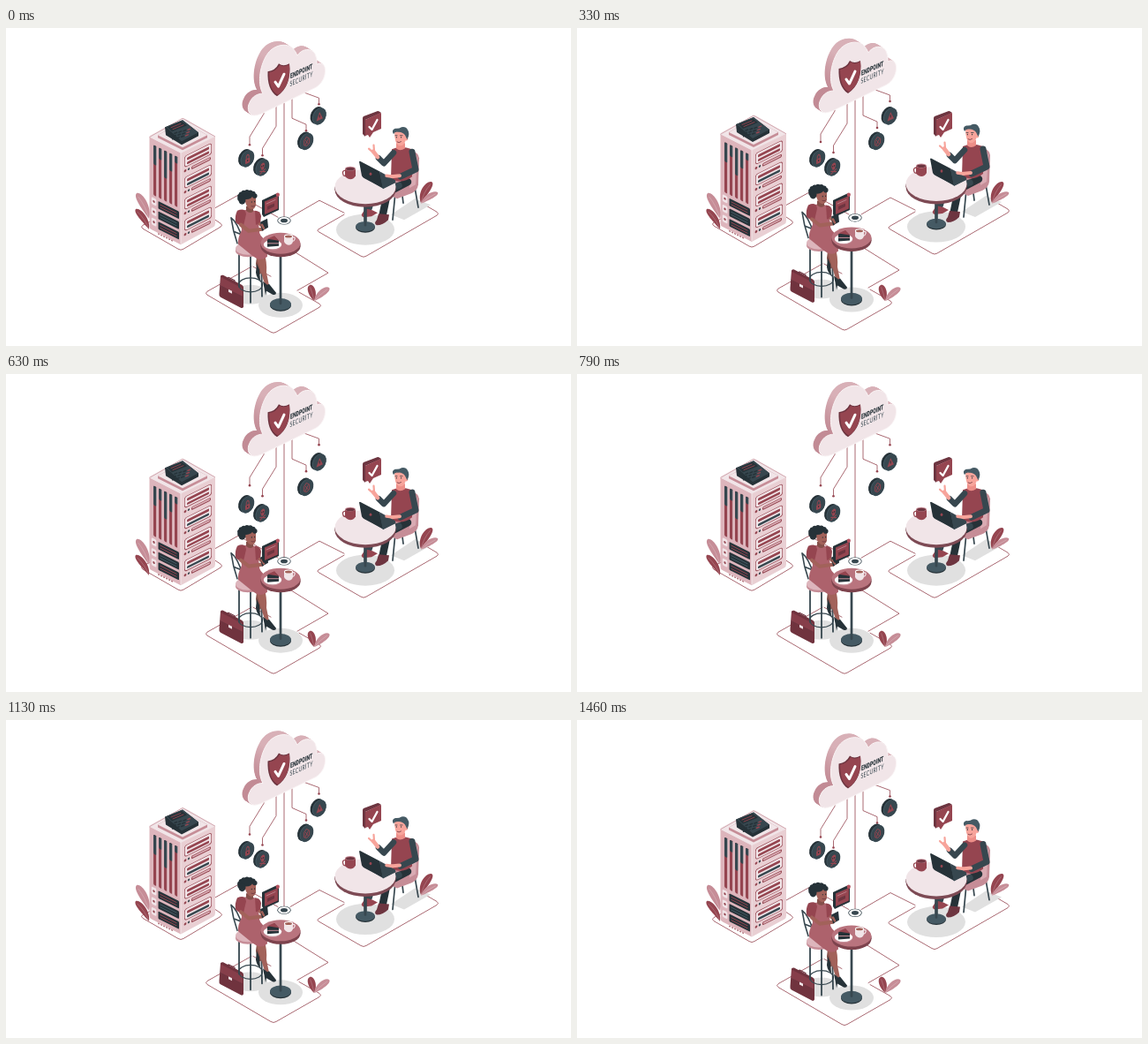
An HTML page with a canvas for the animation above (1.5 s loop, 640 by 360 pixels).

```html
<!DOCTYPE html>
<html lang="en">
<head>
<meta charset="utf-8">
<title>Endpoint security</title>
<style>
html, body { margin: 0; width: 100%; height: 100%; overflow: hidden; background: #fff; }
canvas { display: block; }
</style>
</head>
<body>
<canvas id="stage" width="640" height="360"></canvas>
<script>
const ctx = document.getElementById('stage').getContext('2d');
const LOOP = 1500, LEAD = 1000 / 24, RISE = 7.2, REST = 0.6;
const C = {
  wine: '#954550', deep: '#6d3540', rose: '#c68d97', blush: '#ddb5bc',
  pale: '#f1e5e8', dark: '#37474f', ink: '#263238', skin: '#f7a49b',
  brown: '#a2625a', umber: '#85504a', shade: '#e0e0e0', hair: '#455a64', dress: '#ad626c'
};
ctx.lineJoin = ctx.lineCap = 'round';

function fill(d, color) {
  ctx.fillStyle = color;
  ctx.fill(new Path2D(d));
}
function line(d, color, width = 0.8) {
  ctx.strokeStyle = color;
  ctx.lineWidth = width;
  ctx.stroke(new Path2D(d));
}
function oval(x, y, rx, ry, color, tilt = 0) {
  ctx.beginPath();
  ctx.ellipse(x, y, rx, ry, tilt, 0, Math.PI * 2);
  ctx.fillStyle = color;
  ctx.fill();
}
function rect(x, y, w, h, color, r = 0) {
  ctx.beginPath();
  ctx.roundRect(x, y, w, h, r);
  ctx.fillStyle = color;
  ctx.fill();
}
// Draws in a local space: moved to x, y, then scaled and sheared.
function within(x, y, draw, sx = 1, shear = 0) {
  ctx.save();
  ctx.transform(sx, shear, 0, 1, x, y);
  draw();
  ctx.restore();
}
// A round-tipped leaf from its stem x, y to its tip; bend curves it sideways.
function leaf(x, y, tx, ty, width, color, bend = 0) {
  const dx = tx - x, dy = ty - y, len = Math.hypot(dx, dy);
  const at = (t, k) => `${x + dx * t - dy / len * k} ${y + dy * t + dx / len * k}`;
  fill(`M${x} ${y}C${at(0.35, bend + width)} ${at(1, width)} ${tx} ${ty}` +
    `C${at(0.95, -width)} ${at(0.35, bend - width)} ${x} ${y}Z`, color);
  line(`M${x} ${y}Q${at(0.45, bend * 0.7)} ${at(0.85, 0)}`, 'rgba(255,255,255,.4)', 0.5);
}
function tableTop(x, y, rx, ry, thick, top, edge) {
  oval(x, y + thick, rx, ry, edge);
  rect(x - rx, y, rx * 2, thick, edge);
  oval(x, y, rx, ry, top);
}

function ground() {
  line('M163 219L155 223Q152 225 155 227L195 250Q198 252 201 250L243 225Q246 223 243 221L237 217', C.wine);
  line('M236 204L263 189L308 214M322 214L355 195L383 209', C.wine);
  line('M383 211L355 227Q351 229 355 231L402 258Q405 260 408 258L488 212Q491 210 488 208L464 194', C.wine);
  line('M278 270L228 298Q225 300 228 302L300 344Q303 346 306 344L355 316Q358 314 355 312L332 299', C.wine);
  line('M304 239L365 277L330 297M280 270L300 281', C.wine);
  oval(407, 228, 33, 17.5, C.shade);
  fill('M436 211L463 193L481 200L451 217Z', C.shade);
}

function ring() {
  oval(315, 217.8, 7.7, 4.6, C.dark);
  oval(315, 217.8, 6.9, 4, '#fff');
  oval(315, 217.8, 4, 2.3, C.dark);
}

function serverLeft() {
  for (let i = 0; i < 5; i++) {
    const x = 4 + i * 6, cut = [22, 13, 31, 20, 8][i];
    rect(x, 8, 3.6, 57, C.wine, 1.5);
    rect(x, 8, 3.6, cut, C.dark, 1.5);
    line(`M${x + 3.6} 9V64`, C.pale, 0.5);
  }
  for (let i = 0; i < 3; i++) {
    const y = 69 + i * 11.6;
    rect(1.8, y - 1, 5.5, 8, C.pale, 1.5);
    oval(4.5, y + 3, 1.2, 1.3, C.wine);
    rect(9.5, y, 23.5, 8.6, C.ink, 1);
    line(`M12 ${y + 3}h18M12 ${y + 6}h18`, i % 2 ? C.hair : C.wine, 1);
  }
  for (let i = 0; i < 6; i++) oval(10 + i * 3, 106, 0.8, 0.8, C.wine);
}

function serverRight() {
  for (let i = 0; i < 4; i++) {
    const y = 6 + i * 24;
    rect(4, y, 31, 13, C.wine, 3);
    rect(4.7, y + 0.7, 29.6, 11.6, C.pale, 2.5);
    rect(7, y + 3, 25, 3, C.wine, 1);
    rect(7, y + 8, 25, 2.7, i % 2 ? C.dark : C.wine, 1);
    oval(5, y + 17, 1.4, 1.4, C.wine);
    oval(9, y + 17, 1.2, 1.2, C.dark);
    rect(12, y + 15.5, 22, 3.5, C.wine, 1.5);
    rect(13, y + 16.3, 20, 1.7, C.blush, 0.7);
  }
}

function keypad() {
  for (let row = 0; row < 3; row++) {
    for (let col = 0; col < 4; col++) {
      const x = 191 + col * 5 - row * 1.2, y = 119 - col * 1.3 + row * 3.3;
      line(`M${x} ${y}l2.6 -1`, col > 2 ? C.wine : C.ink, 1.5);
    }
  }
}

function server() {
  fill('M162 124Q162 122 164 121L198 103Q201 101 204 103L235 121Q237 122 237 124L199 144Z', C.pale);
  fill('M162.5 123L198 141V245L165 228Q162.5 227 162.5 224Z', C.blush);
  fill('M198 141L237 122V221Q237 224 235 225L198 245Z', '#e9cfd3');
  line('M163 123L198 141L236.5 122.5M198 141V244', C.pale, 1);
  line('M163 123L200 102L236.5 122.5', C.rose, 0.7);
  within(163, 122, serverLeft, 1, 0.5);
  within(198, 141, serverRight, 1, -0.5);
  fill('M172 121L200 106L228 121V124L200 138L172 124Z', C.rose);
  fill('M172 121L200 106L228 121L200 135Z', C.pale);
  fill('M180 112L181 121L199 132L218 122V118L200 104Z', C.ink);
  fill('M181 112L200 104L218 118L199 128Z', C.dark);
  fill('M183 112L199 105.500L205 110L188 117Z', C.ink);
  line('M187 112.500L198 108M189 114.500L201 109.500', C.wine, 0.9);
  keypad();
}

const cloudFace = 'M284 98.500C275 101 272 91 276 84C279 77 285 74 291 74' +
  'C284 62 288 40 297 28C304 19 318 16 325 23Q328 26 330 31C335 23 346 22 350 29' +
  'Q352.500 34 352 41C357 38 362 41 361.500 49C361 57 357 63 351 67L289 97Z';

function cloud() {
  line('M292 92V97L276 123V131M306 86V111L290.500 136V143M315 80V214M324 74V102L340 109V115M338 66V73L354.500 79V85', C.wine);
  for (const [x, y] of [[276, 132], [290.5, 144], [340, 116], [354.5, 86]]) oval(x, y, 1.3, 1.3, C.wine);
  const side = ctx.createLinearGradient(277, 60, 310, 30);
  side.addColorStop(0, '#c28b95');
  side.addColorStop(0.7, '#d8b0b7');
  for (let i = 14; i > 0; i--) within(-i * 0.48, -i * 0.31, () => fill(cloudFace, side));
  fill(cloudFace, C.pale);
  line(cloudFace, '#faf4f5', 1);
  fill('M296.500 49Q305 48 309 40Q314 44 321 40C323 56 318 70 307 77C299 72 296 62 296.500 49Z', C.deep);
  fill('M298 50Q306 49 310 41.500Q315 45 321 41C322.500 56 318 69 308 75.500C300 71 298 62 298 50Z', C.wine);
  line('M305 61L308.500 66L315 52', '#fff', 3);
  const label = (text, x, y, font, color, gap) => within(x, y, () => {
    ctx.font = font;
    ctx.letterSpacing = gap;
    ctx.fillStyle = color;
    ctx.fillText(text, 0, 0);
  }, 0.65, -0.29);
  label('ENDPOINT', 322, 57, '900 8px Roboto, sans-serif', C.ink, '0px');
  label('SECURITY', 321.5, 66, '8px Lato, sans-serif', C.dark, '0.4px');
}

function coin(x, y, icon) {
  oval(x - 1.6, y - 0.8, 7.2, 10.3, C.ink, 0.45);
  oval(x + 0.9, y + 0.4, 7.2, 10.2, C.hair, 0.45);
  oval(x + 1.3, y + 0.6, 6.8, 9.7, C.dark, 0.45);
  within(x + 1.2, y + 0.5, icon, 0.75, -0.35);
}
function lockIcon() {
  rect(-3.5, -0.5, 7, 5.5, C.wine, 1);
  line('M-2 -1V-3Q0 -6 2 -3V-1', C.wine, 1.3);
  oval(0, 2, 0.9, 1, C.ink);
}
function skullIcon() {
  oval(0, -2, 3.3, 3.3, C.wine);
  rect(-1.8, 0, 3.6, 2.5, C.wine);
  oval(-1.2, -1.7, 0.8, 0.9, C.ink);
  oval(1.2, -1.7, 0.8, 0.9, C.ink);
  line('M-4 3L4 6M4 3L-4 6', C.wine, 1.2);
}
function warnIcon() {
  fill('M0 -5L5 4H-5Z', C.wine);
  line('M0 -1.500V1', C.ink, 1);
}
function bugIcon() {
  line('M0 -5L4 -2V3L0 5L-4 3V-2ZM-2 -2L2 3M2 -2L-2 3', C.wine, 1);
}

function fixedParts() {
  coin(272.5, 147.5, lockIcon);
  coin(289.5, 157.5, skullIcon);
  coin(354, 99.5, warnIcon);
  coin(339.5, 128, bugIcon);

  leaf(162, 216, 148, 187, 6, C.rose, 4);
  leaf(162, 228, 147, 205, 5, C.wine, 4);
  leaf(470, 198, 482, 174, 6, C.wine, -4);
  leaf(470, 199, 489, 186, 4.5, C.rose, -3);
  leaf(349, 309, 344, 291, 5.5, C.wine, 1);
  leaf(349, 309, 366, 294, 5, C.rose, -2);

  fill('M404 102Q404 101 405 100L421 94Q422 93.500 425 96L407 104V123L404 120Z', C.deep);
  fill('M407 104L424 96Q425 96 425 97V114L416 118L412 124L410 121L407 122Z', C.wine);
  line('M411.500 112L414.500 115L420.500 104', '#fff', 2.3);
}

function messageCard() {
  fill('M290 195L306 187.500L309 189V206L296 212L292 214L290 211Z', C.ink);
  fill('M293 196.500L308 190V204.500L293 211Z', C.wine);
  line('M295 199L305 194.500', C.rose, 0.8);
  fill('M296 202L304 198.500V202L296 206Z', C.deep);
  oval(307.8, 188.8, 2.1, 2.3, '#b4525f');
}

function man() {
  line('M441 186L438 217M463 180L467 203M449 190L450 198', C.dark, 1.7);
  fill('M456 142Q466 137 468 147L467 177Q466 184 459 187L443 193L433 188Z', C.rose);
  fill('M458 143Q465 141 466 148L464 177L457 181Z', '#d9abb3');
  line('M455 174L432 186L427 210', C.ink, 8.5);
  line('M445 178L416 188L411 204', C.dark, 7.5);
  fill('M407 204L415 206L421 209L414 213L405 214Q401 212 404 209Z', C.wine);
  fill('M422 210L434 211L433 217Q427 223 420 223Q416 221 420 217Z', C.deep);

  line('M458 141L463 159L448 168', C.dark, 8);
  fill('M437 137Q447 132 460 137L460 168Q449 177 436 171Z', C.wine);
  line('M460 140L464 160L447 168', C.dark, 7);
  line('M439 141L428 153L422 147', C.dark, 6.5);
  line('M446 167L436 168', C.skin, 4);
  line('M421 146L416 139.500', C.skin, 4.6);
  line('M416 141L411 136.500M417 139L416.500 132.500', C.skin, 2.2);
  fill('M442 130H452V136Q446 140 442 136Z', '#ed8e88');
  fill('M440 116H453V126Q451 134 445 133Q440 131 440 116Z', C.skin);
  oval(453.5, 125, 1.8, 2.4, C.skin);
  fill('M439 120Q436 115 441 113.500Q445 114 448 112Q453 111 455 115Q458 119 454.500 126L452 121Q449 117 444 117.500Q440 117 439 120Z', C.hair);
  line('M441 121.500h2M446.500 121.500h2.500', C.ink, 0.7);
  oval(442.3, 123.6, 0.6, 0.8, C.ink);
  oval(447.6, 123.6, 0.6, 0.8, C.ink);
  line('M443 128.800Q445 130.500 447.500 128.500', C.deep, 0.8);

  line('M407 197V224', C.dark, 3.5);
  oval(407, 225.5, 11, 6, C.ink);
  oval(407, 224.5, 11, 5.8, C.hair);
  line('M407 201V223', C.dark, 2.6);
  tableTop(407, 179.5, 34.5, 19.5, 3.5, C.pale, '#7d4a54');
  line('M385 161Q380 161 382 166Q383 168 386 167', C.wine, 1.3);
  fill('M384 159H396V167Q394 171 390 171Q385 170 384 167Z', C.wine);
  oval(390, 159, 6, 2.4, C.rose);
  oval(390, 159.3, 5, 1.8, C.deep);

  fill('M404 168L427 181.500L442 174L420 162Z', C.hair);
  fill('M400 151Q401 150 402 151L423 162L427 181L406 170Q404 169 403 167Z', C.ink);
  fill('M423 162L441 172L441 175L427 182Z', C.dark);
  oval(413, 165, 1.4, 1.7, C.wine);
  line('M438 168L431 167', C.skin, 3.5);
}

function ladyShadows() {
  oval(277, 302, 19, 11, C.shade);
  oval(311, 314, 25, 14, C.shade);
}

function briefcase() {
  fill('M243 281Q244 279.500 246 280L267 291Q269 292 269 294V316Q268 318 266 317L243 305Q241 304 241.500 301Z', '#70333e');
  line('M251 284L252 282.500L259 286V288', C.deep, 1.2);
  fill('M243 282L268 295V304L243 292Z', '#863e4a');
  line('M243 292L268 305', C.deep, 0.9);
  fill('M252 296L256 298V301L252 299Z', C.pale);
}

function lady() {
  line('M264 253V293M277 255V311M289 252L290 304', C.dark, 1.8);
  ctx.beginPath();
  ctx.ellipse(277, 291, 13.5, 8, 0, 0, Math.PI * 2);
  ctx.strokeStyle = C.dark;
  ctx.lineWidth = 1.2;
  ctx.stroke();
  line('M255 215Q257 230 262 244M255 215Q262 220 268 239M259 231L269 235', C.dark, 1.6);
  tableTop(274, 250, 14, 7, 2.5, C.blush, C.rose);

  line('M287 252L285 267L287 277', C.umber, 4);
  fill('M284 267L287 274L288 286Q284 284 283 277Z', C.ink);
  fill('M281 252L292 252Q296 266 295 277L298 292L293 290Q287 271 281 252Z', C.brown);
  fill('M291 287L296 291L298 290L306 300Q306 303 302 302L295 298L294 303L293 297Z', C.ink);
  fill('M264 209Q273 203 284 208L287 229Q286 235 295 241L296 259Q289 266 279 258L263 245Q262 239 267 229Z', C.dress);
  fill('M262 207Q271 203 272 211L269 224Q263 224 260 220Q259 213 262 207Z', C.wine);
  fill('M282 207Q288 207 289 213L288 222L283 223Z', C.wine);
  line('M266 223L275 230L290 228', C.brown, 4.2);
  line('M287 222L291 226', C.brown, 3);
  fill('M288 220L296 216L297 226L290 230Z', C.ink);
  line('M292 227L290 223', C.brown, 2.5);
  fill('M272 202H280V208Q276 211 272 207Z', C.umber);
  fill('M270 191H283L283 201Q281 207 276 205Q271 202 270 191Z', C.brown);
  const curls = 9;
  for (let i = 0; i < curls; i++) {
    const a = Math.PI * (0.78 + i * 0.14);
    oval(273.5 + 8.7 * Math.cos(a), 192 + 6 * Math.sin(a), 2.8, 2.8, C.ink);
  }
  oval(272, 189.5, 7.5, 4.8, C.ink);
  oval(267.5, 195, 4, 5, C.ink);
  oval(278.3, 197.2, 0.6, 0.8, C.ink);
  oval(281.6, 196.8, 0.6, 0.8, C.ink);
  line('M278 202Q280 203 282 201.500', C.deep, 0.8);

  oval(311, 314, 12, 7, C.ink);
  oval(311, 313, 12, 6.7, C.hair);
  line('M311 254V312', C.dark, 2.7);
  tableTop(311, 244, 22.5, 12, 3.5, '#b9747e', '#7d434d');
  oval(302, 246.3, 10.2, 5.4, C.rose);
  oval(302, 245.3, 10.2, 5.2, '#fff');
  fill('M296 240L304 236L309 241V247L296 248Z', C.ink);
  fill('M296 239L304 235.500L309 241Z', C.wine);
  line('M296.500 244L308.500 244', C.rose, 1);
  line('M325 237Q329 237 326 241L324 242', C.pale, 1.2);
  fill('M315 236H325V242Q324 246 320 246Q316 245 315 242Z', C.pale);
  oval(320, 236, 5, 2.2, '#fff');
  oval(320, 236.3, 4, 1.5, C.brown);
}

function draw(ms) {
  const phase = ((ms + LEAD) % LOOP) / LOOP;
  const lift = -RISE * (1 - Math.abs(1 - 2 * phase));
  const floating = (part, amount = 1) => within(0, REST + lift * amount, part);
  ctx.fillStyle = '#fff';
  ctx.fillRect(0, 0, 640, 360);
  floating(ground);
  floating(server);
  floating(cloud);
  floating(ring);
  fixedParts();
  floating(man);
  floating(ladyShadows, 2);
  floating(briefcase, 2);
  floating(lady, 2);
  messageCard();
}

const start = performance.now();
function tick() {
  draw(performance.now() - start);
  requestAnimationFrame(tick);
}
tick();
</script>
</body>
</html>
```
